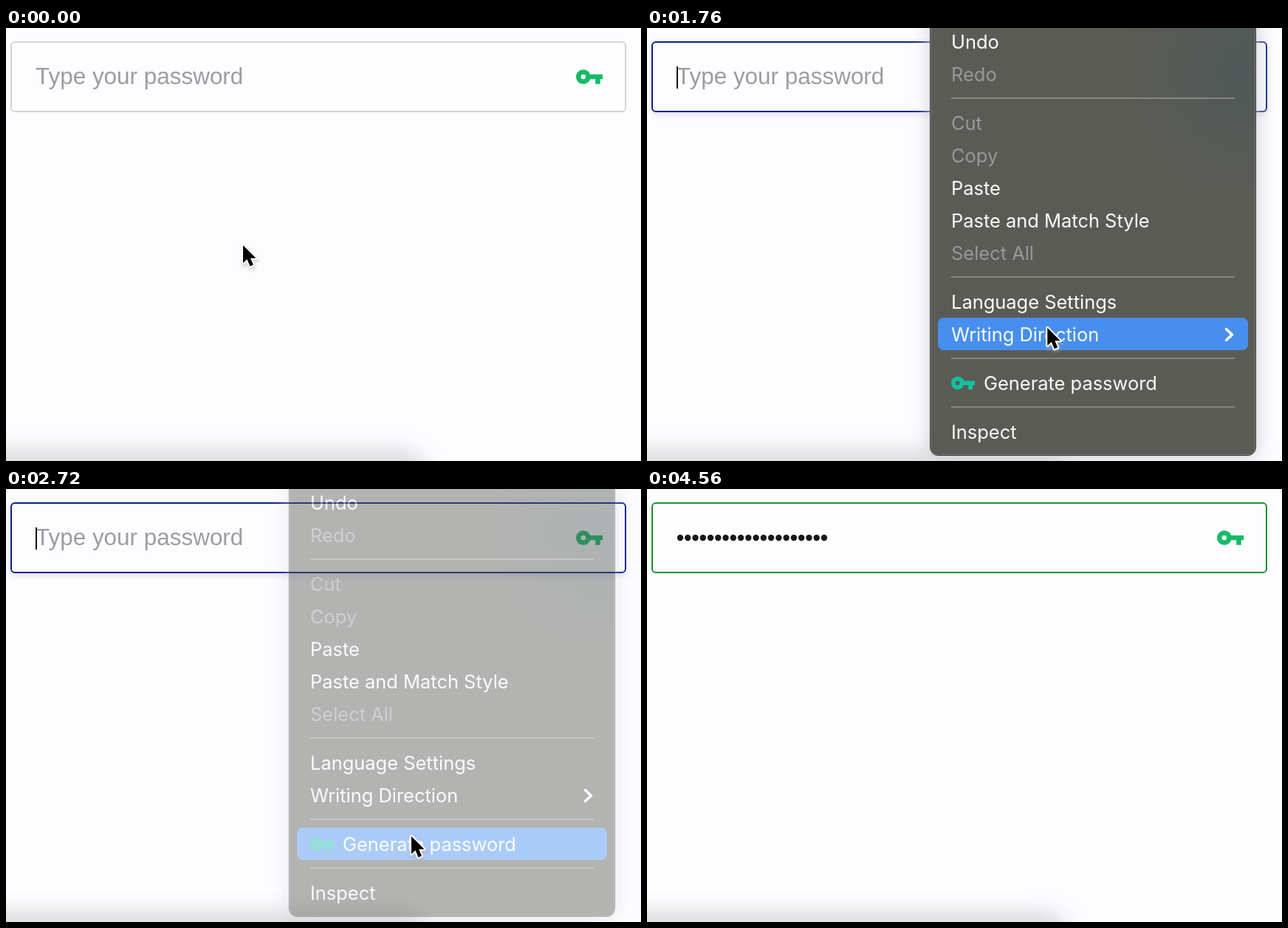
An HTML page for the animation above (4.72 s loop, 860x586 px).

```html
<!DOCTYPE html>
<html lang="en">
<head>
<meta charset="utf-8">
<title>Generate password</title>
<style>
  html, body { margin: 0; width: 100%; height: 100%; overflow: hidden; background: #fdfdff; }
  svg { display: block; width: 860px; height: 586px; }
  .field { font: 31.45px "Liberation Sans", Arial, sans-serif; fill: #9c9ca8; }
  .menu { font: 25.45px Inter, sans-serif; fill: #fcfcfc; }
  .menu .off { fill: #98989a; }
  .soft { filter: blur(12px); }
  .glow { filter: blur(5px); }
</style>
</head>
<body>
<svg viewBox="0 0 860 586">
  <defs>
    <path id="key" d="M12.65 10A5.99 5.99 0 0 0 7 6c-3.31 0-6 2.69-6 6s2.69 6 6 6a5.99 5.99 0 0 0 5.65-4H17v4h4v-4h2v-4zM7 14a2 2 0 1 1 0-4 2 2 0 0 1 0 4z"/>
    <path id="arrow" d="M0 0V24L5.5 19 9.5 28.5 14 26.5 10 17.5H17.5Z"/>
    <radialGradient id="tint" gradientUnits="userSpaceOnUse" cx="815" cy="60" r="170">
      <stop stop-color="#4c5859" stop-opacity=".8"/>
      <stop offset="1" stop-color="#4c5859" stop-opacity="0"/>
    </radialGradient>
  </defs>

  <rect class="soft" x="-100" y="569" width="675" height="140" rx="45" fill="#dedee2"/>

  <rect id="ring" class="glow" x="7" y="22" width="832" height="95" rx="6" fill="#dcdcea"/>
  <rect id="box" x="7" y="19" width="832" height="94" rx="5" fill="#fdfdff" stroke-width="2"/>
  <text id="hint" class="field" x="40" y="76">Type your password</text>
  <g id="dots" fill="#18181a"></g>
  <rect id="caret" x="40" y="52" width="2" height="30" fill="#111"/>
  <use href="#key" transform="translate(770.4 46.4) scale(1.636)" fill="#16bb66"/>

  <g id="menu" class="menu">
    <rect class="soft" x="382" y="-40" width="445" height="622" rx="14" fill="#cfcfda"/>
    <rect x="383.5" y="-40" width="441" height="618.5" rx="11" fill="#5b5b55" stroke="#3a3a38"/>
    <rect x="384.5" y="-40" width="439" height="617.5" rx="10" fill="url(#tint)" stroke="#7c7c78"/>
    <rect id="bar" x="394" width="420" height="44" rx="8" fill="#478fee"/>
    <g id="items"></g>
    <use href="#key" transform="translate(410.5 463) scale(1.4545)" fill="#10c39f"/>
    <path d="M784.5 407.5L792.5 415 784.5 422.5" fill="none" stroke="#fff" stroke-width="3.6" stroke-linecap="round" stroke-linejoin="round"/>
  </g>

  <g id="cursor">
    <use href="#arrow" x="1" y="3" fill="#aaaab0" stroke="#aaaab0" stroke-width="4" opacity=".5" style="filter:blur(2px)"/>
    <use href="#arrow" stroke="#fff" stroke-width="4" stroke-linejoin="round"/>
    <use href="#arrow"/>
  </g>
</svg>
<script>
const LOOP = 4720;
const FOCUS = 960, OPEN = 1040, FADE = 2600, CLOSED = 2820, CARET_OFF = 3000, FILL = 3340;
const IDLE = [212, 212, 216], NAVY = [10, 34, 130], GREEN = [28, 145, 50];

const $ = id => document.getElementById(id);
const [ring, box, hint, dots, caret, menu, bar, items, cursor] =
  ['ring', 'box', 'hint', 'dots', 'caret', 'menu', 'bar', 'items', 'cursor'].map($);

function add(parent, tag, attrs, text = '') {
  const el = document.createElementNS('http://www.w3.org/2000/svg', tag);
  for (const name in attrs) el.setAttribute(name, attrs[name]);
  el.textContent = text;
  parent.append(el);
  return el;
}

// Menu rows: label, vertical centre, enabled
const rows = [
  ['Undo', 19, 1], ['Redo', 63, 0], ['Cut', 129, 0], ['Copy', 173, 0],
  ['Paste', 217, 1], ['Paste and Match Style', 261, 1], ['Select All', 305, 0],
  ['Language Settings', 371, 1], ['Writing Direction', 415, 1],
  ['Generate password', 481, 1], ['Inspect', 547, 1]
];
for (const [label, y, enabled] of rows)
  add(items, 'text', { x: label[0] === 'G' ? 456 : 412, y: y + 9, class: enabled ? '' : 'off' }, label);
for (const y of [95, 337, 447, 513])
  add(items, 'rect', { x: 412, y: y - 1, width: 384, height: 2, fill: '#858580' });
for (let i = 0; i < 20; i++)
  add(dots, 'circle', { cx: 45 + i * 10.26, cy: 66, r: 4.2 });

const smooth = p => p * p * (3 - 2 * p);
const easeOut = p => 1 - (1 - p) ** 2;
const easeIn = p => p * p;
const progress = (t, from, to) => Math.min(1, Math.max(0, (t - from) / (to - from)));
const mix = (a, b, p) => a + (b - a) * p;
const show = (el, on) => el.setAttribute('visibility', on ? 'visible' : 'hidden');

// Pointer stops: time, x, y, easing on the way there
const stops = [
  [0, 321, 294], [840, 382, 71, smooth], [1090, 382, 71, smooth],
  [1400, 528, 269, smooth], [2230, 549, 470, easeOut],
  [2830, 549, 470, smooth], [3220, 560, 600, easeIn]
];

function pointer(t) {
  const i = stops.findIndex(s => s[0] > t);
  if (i < 0) return stops.at(-1).slice(1, 3);
  const [t0, x0, y0] = stops[i - 1], [t1, x1, y1, ease] = stops[i];
  const p = ease(progress(t, t0, t1));
  return [mix(x0, x1, p), mix(y0, y1, p)];
}

function draw(t) {
  const [x, y] = pointer(t);
  cursor.setAttribute('transform', `translate(${x} ${y})`);
  show(cursor, t < 3220);

  const focus = progress(t, FOCUS, FOCUS + 120);
  const valid = progress(t, FILL, FILL + 300);
  const color = IDLE.map((c, i) => mix(mix(c, NAVY[i], focus), GREEN[i], valid));
  box.setAttribute('stroke', `rgb(${color.map(Math.round)})`);
  ring.setAttribute('opacity', focus * (1 - valid));

  const filled = t >= FILL;
  show(hint, !filled);
  show(dots, filled);
  show(caret, t >= FOCUS && t < CARET_OFF);

  menu.setAttribute('opacity', 1 - progress(t, FADE, CLOSED));
  menu.style.display = t >= OPEN && t < CLOSED ? '' : 'none';
  const hot = rows.find(([, mid, enabled]) => enabled && x > 394 && Math.abs(y - mid) <= 22);
  bar.style.display = hot ? '' : 'none';
  if (hot) bar.setAttribute('y', hot[1] - 23);
}

const start = performance.now();
function tick() {
  draw((performance.now() - start) % LOOP);
  requestAnimationFrame(tick);
}
tick();
</script>
</body>
</html>
```
